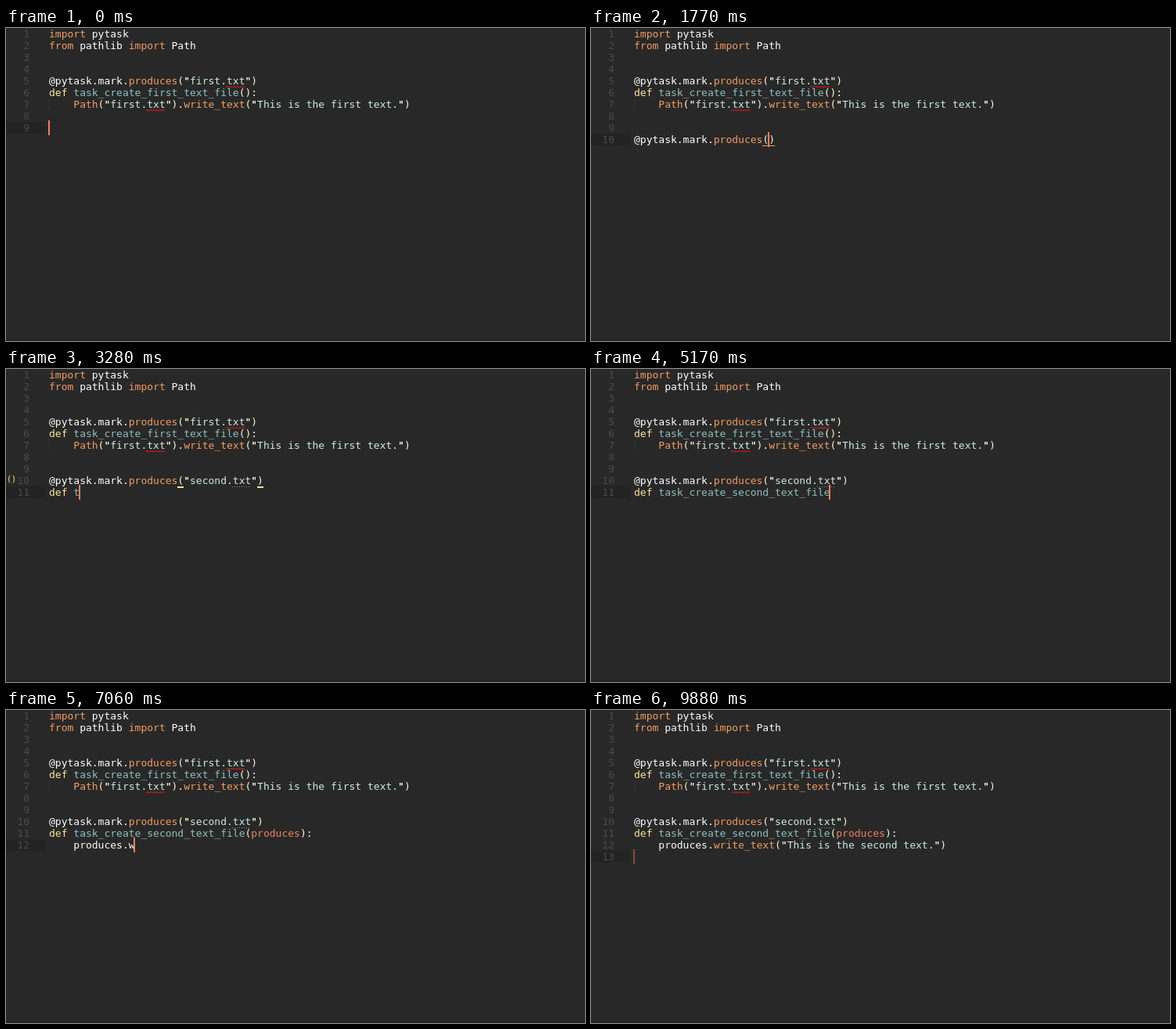
An HTML page with a canvas for the animation above (10000 ms loop, 740x400 px).

```html
<!DOCTYPE html>
<html lang="en">
<head>
<meta charset="utf-8">
<title>Editor typing</title>
<style>
html, body { margin: 0; width: 740px; height: 400px; overflow: hidden; background: #282828; }
canvas { display: block; }
</style>
</head>
<body>
<canvas id="stage" width="740" height="400"></canvas>
<script>
const ctx = document.getElementById('stage').getContext('2d', { alpha: false });
const LOOP = 10000, LEFT = 55, ROW = 15, CHAR = 13 * 1233 / 2048;
const MONO = '"DejaVu Sans Mono", "Liberation Mono", monospace';
const C = {
  bg: '#282828', dark: '#232323', num: '#4a4a4a', text: '#ffffff',
  key: '#f49d62', def: '#fee79d', name: '#92bfbf', param: '#f18260',
  str: '#cfebe4', punct: '#fdf6d8', caret: '#f18260', red: '#f01818',
  dots: '#7f8f90', pair: '#f0e3a4', icon: '#c9ad68'
};

const START = [
  'import pytask',
  'from pathlib import Path',
  '', '',
  '@pytask.mark.produces("first.txt")',
  'def task_create_first_text_file():',
  '    Path("first.txt").write_text("This is the first text.")',
  ''
];

// Key presses, spread evenly between two times.
const keys = [];
function type(from, to, text) {
  const gap = text.length > 1 ? (to - from) / (text.length - 1) : 0;
  [...text].forEach((key, i) => keys.push({ t: from + gap * i, key }));
}
type(80, 80, '\n');
type(180, 1070, '@pytask.mark');
type(1240, 1620, '.pro');
type(1620, 1620, 'duces');
type(1700, 1700, '(');
type(1950, 2160, '"se');
type(2330, 2900, 'cond.txt")');
type(2960, 2960, '\n');
type(3020, 3280, 'def t');
type(3450, 5170, 'ask_create_second_text_file');
type(5260, 5260, '(');
type(5350, 5700, 'produces');
type(5770, 5840, '):');
type(5900, 5900, '\n');
type(6500, 6670, 'pro');
type(6750, 6750, 'duces');
type(6850, 7200, '.wri');
type(7300, 7300, 'te_text');
type(7390, 7480, '("');
type(7550, 7770, 'This');
type(7930, 8010, ' is ');
type(8180, 9030, 'the second text.');
type(9110, 9200, '")');
type(9400, 9400, '\n');

function press(s, { t, key }) {
  s.last = t;
  if (key === '\n') {
    s.rows.push(s.head + s.tail);
    s.head = s.head.endsWith(':') ? '    ' : '';
    s.tail = '';
  } else if (s.tail && s.tail[0] === key) {
    s.head += key;
    s.tail = s.tail.slice(1);
    if (key === ')') Object.assign(s.pair, { b: s.head.length - 1, out: t });
  } else {
    s.head += key;
    if (key === '(') {
      s.tail = ')' + s.tail;
      s.pair = { row: s.rows.length, a: s.head.length - 1, t };
    } else if (key === '"') {
      s.tail = '"' + s.tail;
    }
  }
}

function stateAt(t) {
  const s = { rows: [...START], head: '', tail: '', last: 0, pair: null };
  for (const k of keys) if (k.t <= t + 0.01) press(s, k);
  return s;
}

const colX = col => LEFT + col * CHAR;

function put(text, col, row, color) {
  ctx.fillStyle = color;
  [...text].forEach((ch, i) => {
    if (ch !== ' ') ctx.fillText(ch, colX(col + i), row * ROW + 12);
  });
}

function wordColor(word, line, end) {
  if (word === 'import' || word === 'from') return C.key;
  if (word === 'def') return C.def;
  if (line.startsWith('def ')) {
    const open = line.indexOf('(');
    return open < 0 || end <= open ? C.name : C.param;
  }
  return line[end] === '(' ? C.key : C.text;
}

function drawLine(line, row) {
  for (const m of line.matchAll(/"[^"]*"?|\w+|[^\w"]/g)) {
    const tok = m[0], col = m.index;
    if (tok[0] === '"') {
      put(tok, col, row, C.str);
      put('"', col, row, C.punct);
      if (tok.length > 1 && tok.endsWith('"')) put('"', col + tok.length - 1, row, C.punct);
    } else if (/\w/.test(tok)) {
      put(tok, col, row, wordColor(tok, line, col + tok.length));
    } else {
      put(tok, col, row, '()'.includes(tok) ? C.punct : C.text);
    }
  }
}

function spelling(line, row) {
  const col = line.indexOf('txt');
  if (col < 0) return;
  const x = Math.round(colX(col)) - 1, y = row * ROW + 14;
  if (row < START.length) {
    ctx.strokeStyle = C.red;
    ctx.lineWidth = 1;
    ctx.beginPath();
    for (let i = 0; i <= 12; i++) ctx.lineTo(x + i * 2, y + (i % 2 ? 0.5 : 2));
    ctx.stroke();
  } else {
    ctx.fillStyle = C.dots;
    for (let i = 0; i < 24; i += 3) ctx.fillRect(x + i, y + 1, 1, 1);
  }
}

function underline(col, row, color, thick) {
  const x = Math.round(colX(col));
  ctx.fillStyle = color;
  ctx.fillRect(x, row * ROW + 15, Math.round(colX(col + 1)) - x, thick);
}

function gutterIcon(text, row, x, y, size, color) {
  ctx.font = `bold ${size}px ${MONO}`;
  ctx.fillStyle = color;
  ctx.fillText(text[0], x, row * ROW + y);
  ctx.fillText(text[1], x + 6, row * ROW + y);
  ctx.font = `13px ${MONO}`;
}

function drawPair(s, t) {
  const p = s.pair;
  if (!p || (p.out && t >= p.out + 550)) return;
  const end = s.head.length;
  const quoted = s.tail[0] === '"';
  const close = p.out ? p.b : end + s.tail.indexOf(')');
  const settled = t >= p.t + 250;
  const strong = settled && s.tail !== '")';
  for (const col of [p.a, close]) {
    underline(col, p.row, strong ? C.pair : C.key, strong ? 2 : 1);
  }
  if (quoted) {
    underline(s.head.lastIndexOf('"'), p.row, C.pair, 2);
    underline(end, p.row, C.pair, 2);
    gutterIcon('“”', p.row, 1, 12, 11, '#aaa78e');
  } else if (settled) {
    gutterIcon('()', p.row, 1, 9, 10, C.icon);
  }
}

function caretAlpha(idle) {
  const p = idle % 1000;
  if (p < 430) return 1;
  if (p < 520) return 1 - (p - 430) / 90;
  return p < 910 ? 0 : (p - 910) / 90;
}

function draw(t) {
  const s = stateAt(t);
  const lines = [...s.rows, s.head + s.tail];
  const cur = s.rows.length;

  ctx.fillStyle = C.bg;
  ctx.fillRect(0, 0, 740, 400);
  ctx.fillStyle = C.dark;
  ctx.fillRect(0, cur * ROW, 50, ROW);
  ctx.fillRect(0, 398, 740, 2);
  ctx.fillStyle = '#343434';
  ctx.fillRect(LEFT, 6 * ROW, 1, ROW);

  ctx.font = `13px ${MONO}`;
  ctx.textBaseline = 'alphabetic';
  lines.forEach((line, row) => {
    const num = String(row + 1);
    ctx.fillStyle = C.num;
    [...num].forEach((d, i) => ctx.fillText(d, 30 - (num.length - i) * CHAR, row * ROW + 12));
    drawLine(line, row);
    spelling(line, row);
  });

  drawPair(s, t);

  ctx.globalAlpha = caretAlpha(t - s.last);
  ctx.fillStyle = C.caret;
  ctx.fillRect(Math.floor(colX(s.head.length)) - 1, cur * ROW - 2, 2, 19);
  ctx.globalAlpha = 1;
}

function frame() {
  draw(performance.now() % LOOP);
  requestAnimationFrame(frame);
}
frame();
</script>
</body>
</html>
```
